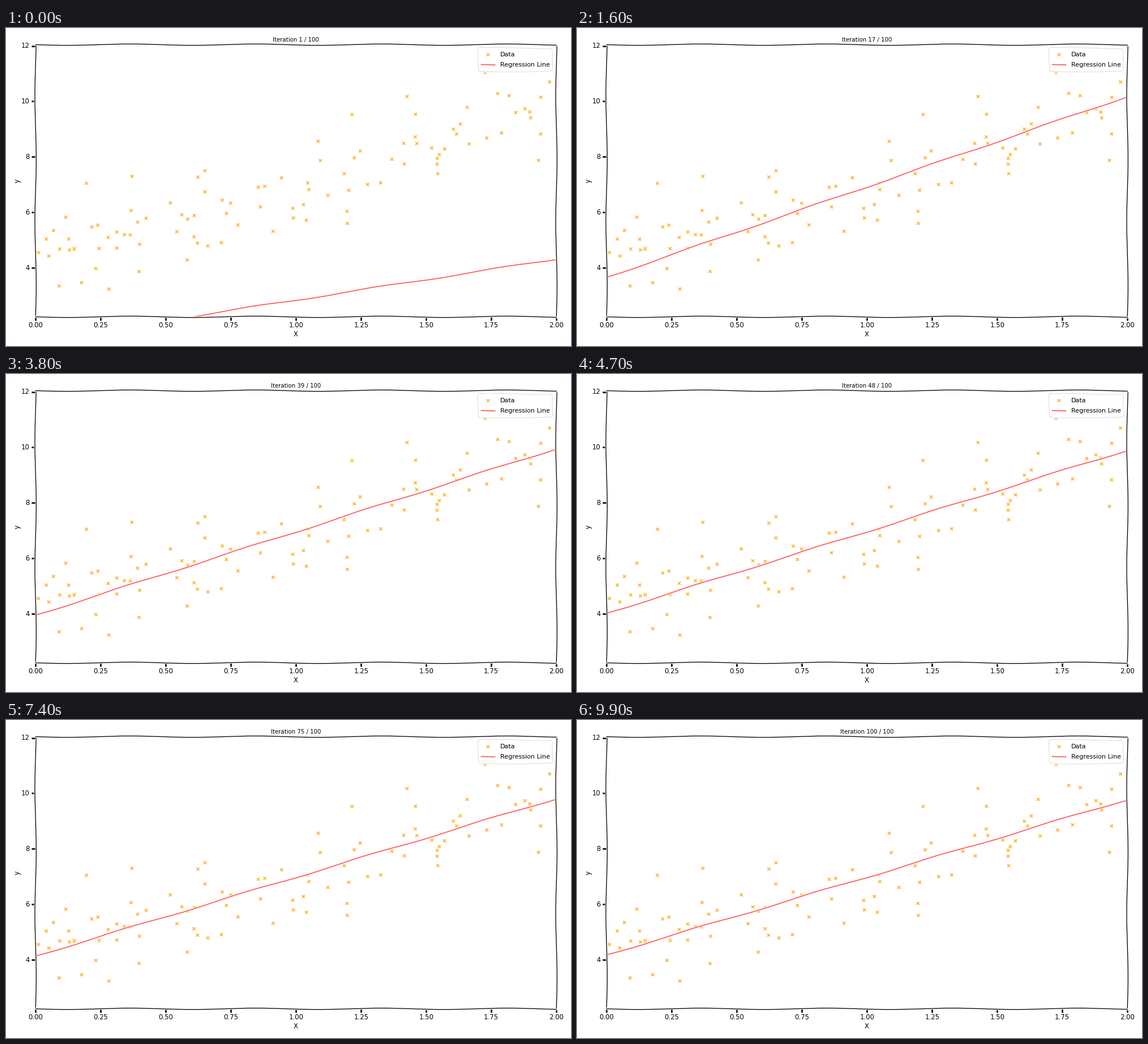
Write a matplotlib script that moves like this. It is 998 px wide and 561 px high and loops after 10000 ms.

```python
import numpy as np
import matplotlib.pyplot as plt
from matplotlib.animation import FuncAnimation
from matplotlib.patches import Polygon, Rectangle
from matplotlib.patheffects import withStroke

W, H, DPI = 998, 561, 64
STEPS, RATE = 100, 0.1
LEFT, RIGHT, TOP, BOTTOM = 52.2, 972.2, 29.4, 509.5

plt.rcParams["font.family"] = "DejaVu Sans"


def px(n):
    """Pixels to points."""
    return n * 72 / DPI


# Noisy linear data and its gradient descent fit
np.random.seed(42)
x = 2 * np.random.rand(100)
y = 4 + 3 * x + np.random.randn(100)
y_lo, y_hi = y.min() - 1, y.max() + 1

design = np.column_stack([np.ones_like(x), x])
theta = np.zeros(2)
fits = []
for _ in range(STEPS):
    theta = theta - RATE * 2 / len(x) * design.T @ (design @ theta - y)
    fits.append(theta)


def sx(v):
    return LEFT + (RIGHT - LEFT) * v / 2


def sy(v):
    return BOTTOM - (BOTTOM - TOP) * (v - y_lo) / (y_hi - y_lo)


def wavy(points, amp=1.2, wavelength=222):
    """Resample a polyline and push it sideways along a sine, like a pen stroke."""
    p = np.asarray(points, float)
    dist = np.r_[0, np.cumsum(np.hypot(*np.diff(p, axis=0).T))]
    s = np.linspace(0, dist[-1], int(dist[-1]) + 2)
    u, v = np.interp(s, dist, p[:, 0]), np.interp(s, dist, p[:, 1])
    du, dv = np.gradient(u), np.gradient(v)
    r = amp * np.sin(2 * np.pi * s / wavelength) / np.hypot(du, dv)
    return u - r * dv, v + r * du


fig = plt.figure(figsize=(W / DPI, H / DPI), dpi=DPI, facecolor="white")
ax = fig.add_axes([0, 0, 1, 1])
ax.set_xlim(0, W)
ax.set_ylim(H, 0)
ax.axis("off")

halo = [withStroke(linewidth=px(3.46), foreground="white")]
pen = dict(color="red", alpha=0.65, lw=px(1.73), path_effects=halo)


def label(u, v, text, size=11.6, **kw):
    return ax.text(u, v, text, fontsize=px(size), color="black", zorder=6, **kw)


def crosses(u, v, z):
    ax.scatter(u, v, s=px(5.2) ** 2, marker="x", c="orange", alpha=0.8,
               linewidths=px(1.73), path_effects=halo, zorder=z)


crosses(sx(x), sy(y), 1)

line, = ax.plot([], [], zorder=2, **pen)
line.set_clip_path(Rectangle((LEFT, TOP), RIGHT - LEFT, BOTTOM - TOP,
                             transform=ax.transData))

# Ticks and their labels
tick = dict(color="black", lw=px(2.6), solid_capstyle="butt", zorder=2.1)
for v in np.arange(0, 2.01, 0.25):
    ax.plot([sx(v)] * 2, [BOTTOM, BOTTOM + 6.9], **tick)
    label(sx(v), 524.4, f"{v:.2f}", ha="center", va="center")
for v in range(4, 13, 2):
    ax.plot([LEFT - 6.9, LEFT], [sy(v)] * 2, **tick)
    label(42, sy(v), str(v), ha="right", va="center")

# Hand-drawn frame
for a, b in [((LEFT, BOTTOM), (LEFT, TOP)),
             ((RIGHT, BOTTOM), (RIGHT, TOP)),
             ((LEFT, BOTTOM), (RIGHT, BOTTOM)),
             ((LEFT, TOP), (RIGHT, TOP))]:
    ax.plot(*wavy([a, b]), color="black", lw=px(1.3), zorder=2.5,
            solid_capstyle="projecting", path_effects=halo)

label(512, 541, "X", ha="center", va="center")
label(20.5, 269.5, "y", ha="center", va="center", rotation=90)
title = label(512, 24, "", 10.15, ha="center", va="baseline")

# Legend
l, r, t, b, c = 834.4, 966.1, 35.5, 76.4, 2
box = wavy([(l + c, b), (r - c, b), (r, b - c), (r, t + c), (r - c, t),
            (l + c, t), (l, t + c), (l, b - c), (l + c, b)])
ax.add_patch(Polygon(np.column_stack(box), facecolor="white", edgecolor="0.8",
                     alpha=0.8, lw=px(0.87), path_effects=halo, zorder=5))
crosses([851.5], [47], 5.5)
ax.plot(*wavy([(839.4, 64.4), (863.6, 64.4)]), zorder=5.5, **pen)
label(873, 50.3, "Data", 11.1)
label(873, 68.4, "Regression Line", 11.1)


def update(i):
    bias, slope = fits[i]
    line.set_data(*wavy([(sx(0), sy(bias)), (sx(2), sy(bias + 2 * slope))]))
    title.set_text(f"Iteration {i + 1} / {STEPS}")
    return line, title


anim = FuncAnimation(fig, update, frames=STEPS, interval=100, repeat=True,
                     repeat_delay=0, blit=False)
plt.show()
```
